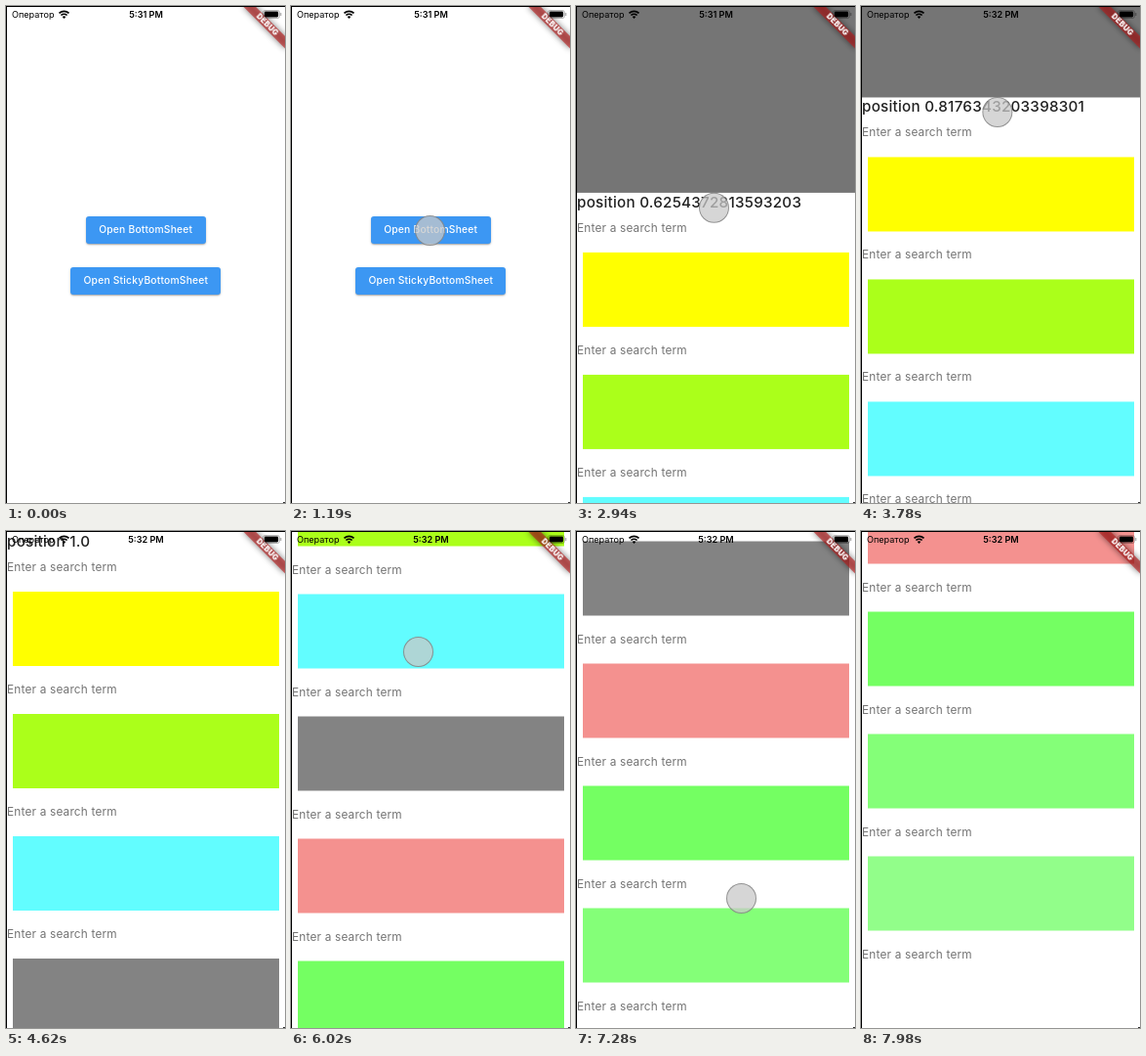
These frames come from a looping animation (286 px wide and 508 px high, 8000 ms). An HTML page:

```html
<!DOCTYPE html>
<html lang="en">
<head>
<meta charset="utf-8">
<title>Bottom sheet</title>
<style>
  html, body { margin: 0; width: 100%; height: 100%; overflow: hidden; background: #fff; }
  #stage {
    position: relative; width: 286px; height: 508px; overflow: hidden; background: #fff;
    font-family: Inter, Roboto, "Liberation Sans", sans-serif; white-space: nowrap;
  }
  #stage div, #stage svg { position: absolute; box-sizing: border-box; }
  .button {
    height: 27.4px; border-radius: 3px; background: #3c97f3; color: #fff;
    font: 500 10.3px/27.4px Inter, Roboto, sans-serif; letter-spacing: .2px; text-align: center;
    box-shadow: 0 1.5px 1.5px -1px rgba(0,0,0,.2), 0 1px 1.5px rgba(0,0,0,.16), 0 1px 3px rgba(0,0,0,.12);
  }
  #scrim { inset: 0; background: rgba(0,0,0,.54); opacity: 0; }
  #slide { inset: 0; }
  #sheet { left: 1px; top: 0; width: 285px; height: 508px; background: #fff; overflow: hidden; }
  #list { left: 0; top: 0; width: 285px; }
  #title { left: 0; top: 0; font-size: 15.2px; line-height: 19px; font-weight: 500; letter-spacing: .25px; color: #212121; }
  .hint { left: 0; font-size: 11.8px; line-height: 16px; letter-spacing: .2px; color: #747474; }
  .block { left: 6px; width: 273px; height: 76px; }
  #corner { left: 286px; top: 1px; transform: rotate(45deg); transform-origin: 0 0; }
  #corner div { left: -30.4px; top: 21.3px; width: 60.8px; height: 9.1px; }
  #corner .shade { background: rgba(0,0,0,.5); filter: blur(3px); }
  #corner .band {
    background: rgba(183,28,28,.627); color: #fff; text-align: center;
    font-size: 7.75px; line-height: 9.1px; font-weight: 900; letter-spacing: .2px;
  }
  .status { top: 3px; font-size: 9.1px; line-height: 12px; color: #000; }
  #clock { left: 94px; width: 99px; text-align: center; font-weight: 600; }
  #icons { left: 0; top: 0; }
  #touch {
    left: -15.5px; top: -15.5px; width: 31px; height: 31px; border-radius: 50%;
    background: rgba(200,200,200,.75); border: 1px solid rgba(110,110,110,.65);
  }
  #edge { inset: 0; border: solid #000; border-width: 1px 0 0 1px; }
  #dot { right: 0; bottom: 0; width: 2px; height: 1px; background: #333; }
</style>
</head>
<body>
<div id="stage">
  <div class="button" style="left:82px;top:215.3px;width:122.5px">Open BottomSheet</div>
  <div class="button" style="left:66.3px;top:267.3px;width:154.2px">Open StickyBottomSheet</div>
  <div id="scrim"></div>
  <div id="slide"><div id="sheet"><div id="list"><div id="title"></div></div></div></div>
  <div id="corner"><div class="shade"></div><div class="band">DEBUG</div></div>
  <div class="status" style="left:6px">Оператор</div>
  <div class="status" id="clock"></div>
  <svg id="icons" width="286" height="20" fill="none" stroke="#000">
    <path d="M54.5 7.4a7.2 7.2 0 0 1 10 0M56.4 9.5a4.5 4.5 0 0 1 6.2 0" stroke-width="1.7"/>
    <path d="M59.5 13l-1.8-2a2.7 2.7 0 0 1 3.6 0z" fill="#000" stroke="none"/>
    <rect x="263.5" y="4.5" width="17" height="8" rx="2.2" stroke-opacity=".35" stroke-width=".8"/>
    <rect x="264.8" y="5.6" width="14.4" height="5.8" rx="1.3" fill="#000" stroke="none"/>
    <path d="M281.8 7v3" stroke-opacity=".4"/>
  </svg>
  <div id="touch"></div>
  <div id="edge"></div>
  <div id="dot"></div>
</div>
<script>
const LOOP = 8000, STEP = 70, PITCH = 125, VIEW = 507;
const COLORS = ['#ffff00', '#abff1a', '#62fdff', '#838383', '#f4918f', '#74ff62', '#84ff78', '#92fe8a'];
const $ = id => document.getElementById(id);

// Tracks: [time, value, easing power towards the next point]
const POSITION = [[2380, .5], [2940, .6254372813593203], [4060, .8817], [4480, .985], [4620, 1]];
const SCROLL = [
  [5530, 0], [5600, 14], [5740, 92], [5880, 180], [6020, 247.5], [6090, 276, 2],
  [7210, 426.5], [7280, 426.5], [7350, 444], [7490, 507], [7630, 555, 2], [7980, 604.5]
];
const DRAG_X = [[2310, 146], [2940, 141], [4480, 138]];
const DRAG_Y = [[2310, 272], [2380, 272], [2940, 205.8], [4060, 75.5], [4480, 20]];
const FLICK_X = [[5530, 146], [6020, 130]];

function at(track, t) {
  if (t <= track[0][0]) return track[0][1];
  for (let i = track.length - 1; i >= 0; i--) {
    const [start, from, power = 1] = track[i];
    if (t < start) continue;
    const next = track[i + 1];
    if (!next) return from;
    const k = (t - start) / (next[0] - start);
    return from + (next[1] - from) * (1 - (1 - k) ** power);
  }
}

function touchAt(t, scroll) {
  if (t >= 910 && t < 1260) return [142, 229];
  if (t >= 2310 && t < 4550) return [at(DRAG_X, t), at(DRAG_Y, t)];
  if (t >= 5530 && t < 6110) return [at(FLICK_X, t), 370.5 - scroll];
  if (t >= 7270 && t < 7640) return [169, 801.5 - scroll];
  return null;
}

function add(className, top, text = '') {
  const el = document.createElement('div');
  el.className = className;
  el.style.top = top + 'px';
  el.textContent = text;
  $('list').append(el);
  return el;
}

for (let i = 0; i <= COLORS.length; i++) {
  const top = 60.5 + i * PITCH;
  add('hint', top - 32.3, 'Enter a search term');
  if (COLORS[i]) add('block', top).style.background = COLORS[i];
}

const timing = { delay: 1294, duration: 500, easing: 'ease', fill: 'both' };
const opening = [
  $('slide').animate({ transform: [`translateY(${VIEW}px)`, 'none'] }, timing),
  $('scrim').animate({ opacity: [0, 1] }, timing)
];
opening.forEach(a => a.pause());

function render(t) {
  const position = at(POSITION, t), scroll = at(SCROLL, t), touch = touchAt(t, scroll);
  opening.forEach(a => { a.currentTime = t; });
  $('sheet').style.transform = `translateY(${508 - VIEW * position}px)`;
  $('list').style.transform = `translateY(${-scroll}px)`;
  $('title').textContent = 'position ' + (position === 1 ? '1.0' : position);
  $('clock').textContent = t < 3710 ? '5:31 PM' : '5:32 PM';
  $('touch').style.visibility = touch ? 'visible' : 'hidden';
  if (touch) $('touch').style.transform = `translate(${touch[0]}px, ${touch[1]}px)`;
}

const begin = performance.now();
function tick() {
  const t = (performance.now() - begin) % LOOP;
  render(Math.floor(t / STEP) * STEP);
  requestAnimationFrame(tick);
}
tick();
</script>
</body>
</html>
```
